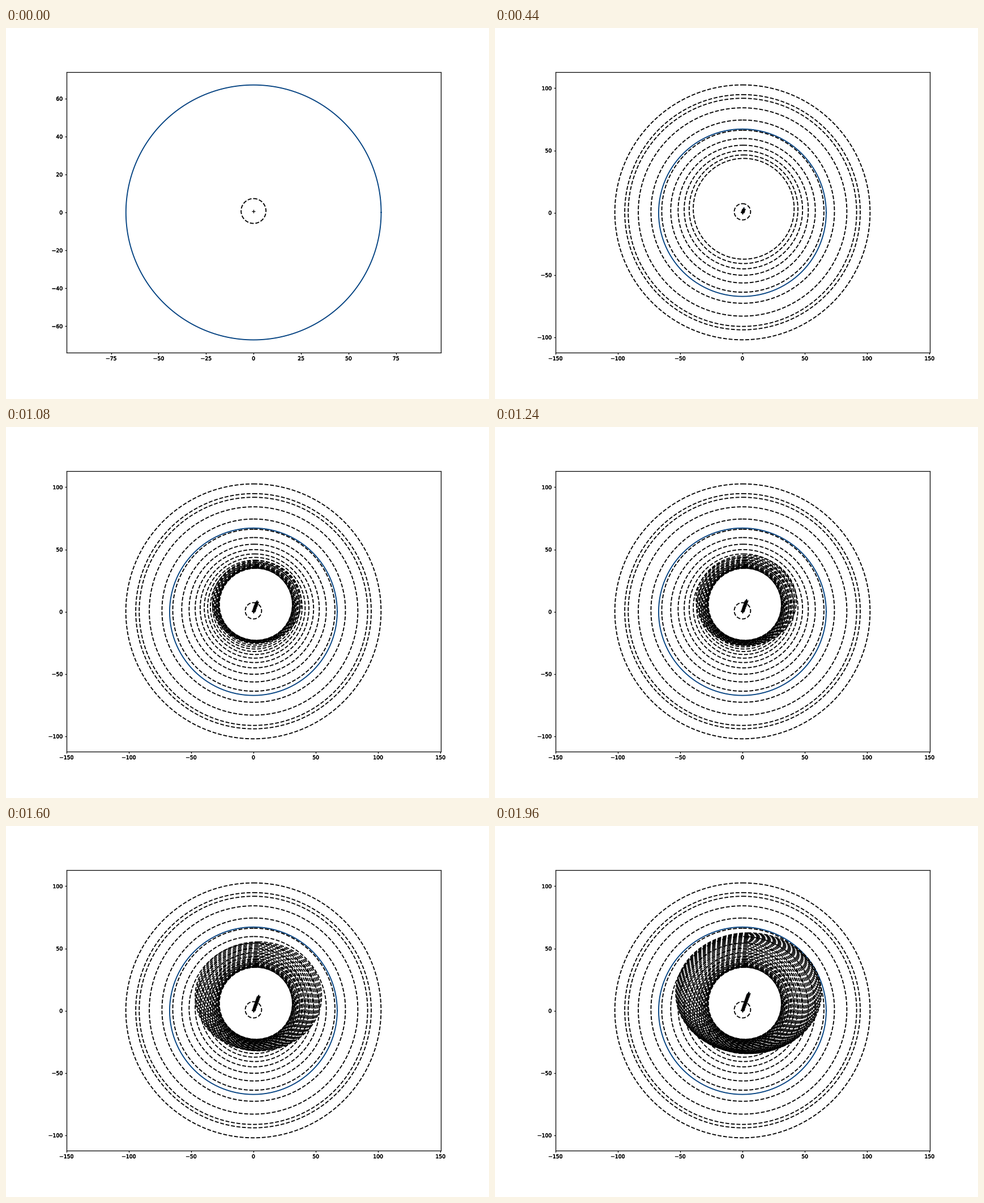
These frames come from a looping animation (853x656 px, 2000 ms). A matplotlib script:

```python
import numpy as np
import matplotlib.pyplot as plt
from matplotlib.animation import FuncAnimation
from matplotlib.patheffects import withStroke

W, H, DPI = 853, 656, 64
PX = 72 / DPI            # points per pixel
FRAMES, LOOP_MS = 50, 2000
BLUE = "#004080"
R_REF = 67.2             # radius of the fixed circle
TURN = 19                # step where the outline starts to flatten

plt.rcParams.update({
    "font.family": "DejaVu Sans",
    "font.size": 9.26 * PX,
    "axes.linewidth": 1.25 * PX,
    "lines.linewidth": 1.85 * PX,
})


def centre(k):
    """Steady drift up and to the right after a slow start."""
    ramp = 1 - np.exp(-(k / 6.5) ** 2)
    return 0.1 * k * ramp, 0.25 + 0.5 * 0.1 ** k + 0.282 * k * ramp


def half_axes(k):
    """A burst that decays like 1/k, overtaken by slow growth."""
    decay = (471 - 505 * 0.57 ** k) / (k + 1)
    growth = 62 * np.exp(-np.exp(0.0735 * (29.4 - k)))
    dip = 1.5 * np.exp(-((k - 20) / 3.5) ** 2)
    a = np.maximum(6.55, decay + growth - dip)
    return a, a - 0.33 * np.maximum(k - TURN, 0)


def outline(k):
    """Ellipse traced from its top; the direction flips once it flattens."""
    theta = np.linspace(0, 2 * np.pi, 241)
    side = 1 if k < TURN else -1
    x, y = centre(k)
    a, b = half_axes(k)
    return x + side * a * np.sin(theta), y + b * np.cos(theta)


fig = plt.figure(figsize=(W / DPI, H / DPI), dpi=DPI, facecolor="white")
width, height = 0.775, 0.775 * 0.75 * W / H
ax = fig.add_axes([0.125, 0.125, width, height])
ax.tick_params(length=3.24 * PX, pad=3.24 * PX, width=1.25 * PX)

phi = np.linspace(0, 2 * np.pi, 241)
ax.plot(R_REF * np.cos(phi), R_REF * np.sin(phi), color=BLUE)
track, = ax.plot([], [], color=BLUE)
rings = [ax.plot(*outline(k), "k--")[0] for k in range(FRAMES)]
marks, = ax.plot([], [], "k+", markersize=5.2 * PX, markeredgewidth=1.3 * PX)
heavy = [withStroke(linewidth=0.45 * PX, foreground="black")]


def set_view(k):
    """Fit the limits to everything drawn so far."""
    half = 1.1 * max(R_REF, half_axes(np.arange(k + 1))[1].max())
    mid_x, mid_y = (0.1, 0.25) if k else (0, 0)
    ax.set_xlim(mid_x - half * 4 / 3, mid_x + half * 4 / 3)
    ax.set_ylim(mid_y - half, mid_y + half)
    for label in ax.get_xticklabels() + ax.get_yticklabels():
        label.set_path_effects(heavy)


def update(k):
    for i, ring in enumerate(rings):
        ring.set_visible(i <= k)
    marks.set_data(*centre(np.arange(k + 1)))
    # the track runs slightly ahead of the newest centre
    track.set_data(*centre(np.arange(1, k + 3)))
    track.set_visible(k > 0)
    set_view(k)
    return [*rings, marks, track]


anim = FuncAnimation(fig, update, frames=FRAMES, init_func=lambda: update(0),
                     interval=LOOP_MS / FRAMES, repeat=True, repeat_delay=0)
plt.show()
```
